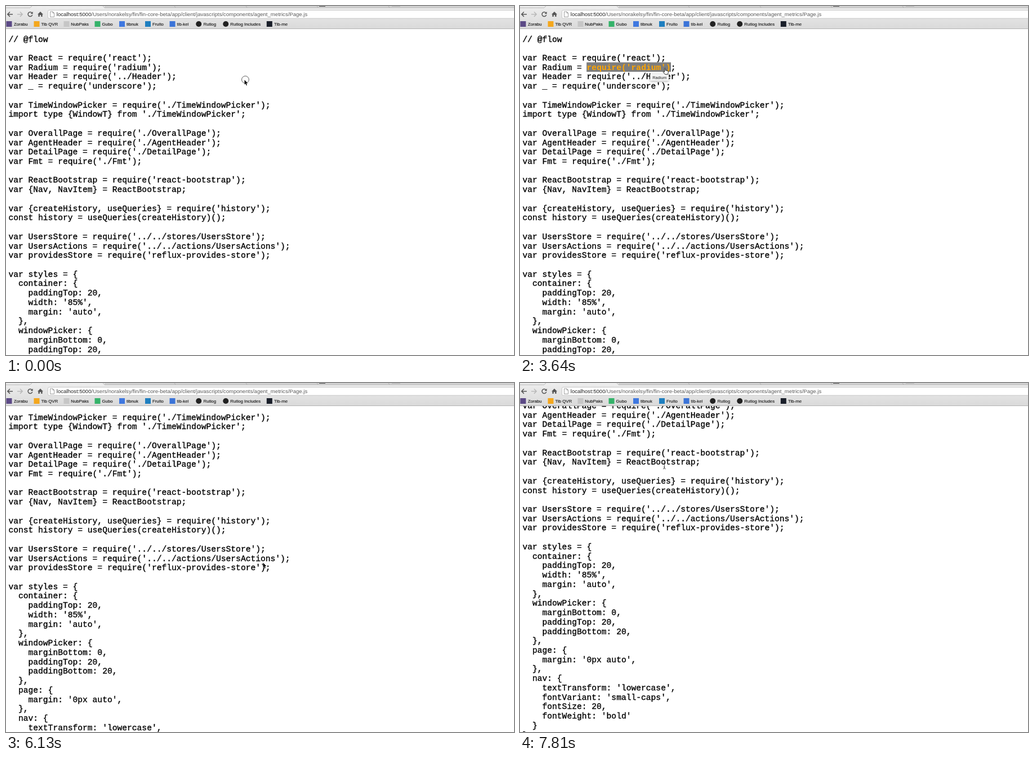
Animation of 902x621 px, one loop 7990 ms. Source, as an HTML page:

```html
<!DOCTYPE html>
<html lang="en">
<head>
<meta charset="utf-8">
<title>Source view</title>
<style>
  html, body { margin: 0; width: 100%; height: 100%; overflow: hidden; background: #fff; }
  svg { display: block; width: 100vw; height: 100vh; }
  text { white-space: pre; }
  .code { font: 14.64px "Liberation Mono", "Courier New", monospace; }
  #code { stroke: #000; stroke-width: .35; }
  .bold { font-weight: bold; fill: #ffa500; }
  .ui { font-family: "Liberation Sans", Arial, sans-serif; }
  .label { font-size: 7.8px; fill: #1a1a1a; stroke: #1a1a1a; stroke-width: .15; }
  #tip rect { filter: drop-shadow(0 1.5px 2px rgba(0, 0, 0, .35)); }
</style>
</head>
<body>
<svg viewBox="0 0 902 621" xmlns="http://www.w3.org/2000/svg">
  <defs>
    <linearGradient id="bar" x2="0" y2="1">
      <stop offset="0" stop-color="#eeeeee"/>
      <stop offset="1" stop-color="#d9d9d9"/>
    </linearGradient>
  </defs>

  <g id="code" class="code"></g>

  <g id="mark" class="code">
    <rect x="118.2" y="100.3" width="149.8" height="16.8" fill="#7d7d7d"/>
    <text class="bold" x="118.6" y="113.7">require('radium')</text>
  </g>

  <g id="chrome" class="ui">
    <rect width="902" height="41" fill="url(#bar)"/>
    <rect x="175" width="727" height="3" fill="#d2d2d2"/>
    <path d="M0 3.2H43L46 0M172 0L175 3.2H902M299 0l2 3M426 0l2 3M552 0l2 3M679 0l2 3" fill="none" stroke="#aaa" stroke-width=".8"/>
    <path d="M556 0h11v1h-11z" fill="#444"/>
    <path d="M685 0h15v.8h-15z" fill="#aaa"/>
    <rect x="74.5" y="7.5" width="840" height="14.5" rx="2" fill="#fff" stroke="#bdbdbd" stroke-width=".8"/>
    <rect y="40" width="902" height="1" fill="#b3b3b3"/>
    <g fill="none" stroke="#555" stroke-width="1.5">
      <path d="M12 14.7H3M7 10.5L2.8 14.7L7 18.9"/>
      <path d="M20 14.7H29M25 10.5L29.2 14.7L25 18.9" stroke="#b9b9b9"/>
      <path d="M46 12.2A3.9 3.9 0 1 0 46.8 15.6"/>
    </g>
    <path d="M47.6 10V14H43.6Z" fill="#555"/>
    <path d="M56 15L61 10L66 15H64.6V19H62.2V16H59.8V19H57.4V15Z" fill="#555"/>
    <path d="M78.5 10H83L85.5 12.5V19.5H78.5ZM83 10V12.5H85.5" fill="#fff" stroke="#888" stroke-width=".8"/>
    <text x="89.8" y="18" font-size="9.57" fill="#5c5c5c"><tspan fill="#222">localhost:5000</tspan>/Users/norakelsy/fin/fin-core-beta/app/client/javascripts/components/agent_metrics/Page.js</text>
  </g>

  <g id="tip" class="ui">
    <rect x="231" y="121" width="33" height="12" fill="#f3f3f3"/>
    <text x="235.2" y="129.7" font-size="7.3" fill="#222">Radium</text>
  </g>

  <circle id="ring" cx="424.9" cy="131" r="6.4" fill="none" stroke="#333" stroke-width=".8"/>

  <path id="arrow" d="M.5 .4V8.8L2.3 7.1L3.7 10.4L5 9.8L3.6 6.6H6.3Z" fill="#000" stroke="#fff" stroke-width=".9" paint-order="stroke"/>
  <path id="hand" d="M3 7V1.3Q3 .5 3.8 .5T4.6 1.3V4.4L8.4 5.1Q9.6 5.4 9.5 6.7V8.6L8.6 11.5H4L1 8.2Q.2 7.2 1 6.7Q1.8 6.4 3 7.6" fill="#fff" stroke="#111" stroke-width=".9" stroke-linejoin="round"/>
  <path id="beam" d="M-2.3 -5Q0 -5 0 -3.6V3.6Q0 5 -2.3 5M2.3 -5Q0 -5 0 -3.6M0 3.6Q0 5 2.3 5M-1.2 2H1.2" fill="none" stroke="#222" stroke-width=".8"/>
</svg>

<script>
const LOOP = 7990;
const $ = id => document.getElementById(id);

const source = `// @flow

var React = require('react');
var Radium = require('radium');
var Header = require('../Header');
var _ = require('underscore');

var TimeWindowPicker = require('./TimeWindowPicker');
import type {WindowT} from './TimeWindowPicker';

var OverallPage = require('./OverallPage');
var AgentHeader = require('./AgentHeader');
var DetailPage = require('./DetailPage');
var Fmt = require('./Fmt');

var ReactBootstrap = require('react-bootstrap');
var {Nav, NavItem} = ReactBootstrap;

var {createHistory, useQueries} = require('history');
const history = useQueries(createHistory)();

var UsersStore = require('../../stores/UsersStore');
var UsersActions = require('../../actions/UsersActions');
var providesStore = require('reflux-provides-store');

var styles = {
  container: {
    paddingTop: 20,
    width: '85%',
    margin: 'auto',
  },
  windowPicker: {
    marginBottom: 0,
    paddingTop: 20,
    paddingBottom: 20,
  },
  page: {
    margin: '0px auto',
  },
  nav: {
    textTransform: 'lowercase',
    fontVariant: 'small-caps',
    fontSize: 20,
    fontWeight: 'bold'
  }
};`;

// Bookmarks: label, label x, icon x, icon colour, round icon
const bookmarks = [
  ['Zorabu', 14, 0.5, '#5c4a86'],
  ['Tib QVR', 62.5, 49.5, '#f4a71d'],
  ['NubPaks', 115.3, 102.5, '#c6c6c6'],
  ['Gubo', 170.5, 157.5, '#35b36a'],
  ['tibnuk', 214, 201, '#3f78e0'],
  ['Frulto', 260, 247, '#1f7fc0'],
  ['tib-kel', 303.5, 290.5, '#3b74d8'],
  ['Rutlog', 350.5, 337.2, '#222', true],
  ['Rutlog Includes', 398.3, 385.2, '#222', true],
  ['Tib-me', 476, 462.8, '#1a1f2a'],
];

function add(parent, tag, attrs, text = '') {
  const el = document.createElementNS('http://www.w3.org/2000/svg', tag);
  for (const key in attrs) el.setAttribute(key, attrs[key]);
  el.textContent = text;
  parent.append(el);
}

source.split('\n').forEach((line, i) => {
  if (line) add($('code'), 'text', { x: 4.4, y: 63.5 + i * 16.73 }, line);
});

for (const [label, x, iconX, fill, round] of bookmarks) {
  add($('chrome'), 'rect', { x: iconX, y: 27, width: 10, height: 10, rx: round ? 5 : 0, fill });
  add($('chrome'), 'text', { x, y: 34.9, class: 'label' }, label);
}

// Every change is a hard step: [start, ...values]
const pointer = [
  [0, 'arrow', 423, 131],
  [600, 'arrow', 412.4, 127.2],
  [740, 'arrow', 295.4, 109.2],
  [1040, 'arrow', 288.6, 109.2],
  [1190, 'arrow', 229.4, 109.2],
  [1340, 'hand', 227.5, 108.8],
  [3640, 'hand', 253.7, 110.2],
  [3810, 'arrow', 447.5, 176],
  [3960, 'arrow', 453.6, 258.5],
  [4110, 'arrow', 430.6, 279.5],
  [4260, 'arrow', 430.4, 285.4],
  [4400, 'arrow', 432.6, 289.4],
  [4550, 'arrow', 432.8, 287.4],
  [4700, 'arrow', 432.8, 281.4],
  [4880, 'arrow', 456, 319.3],
  [7170, 'arrow', 380.4, 248],
  [7370, 'beam', 284, 177],
  [7520, 'beam', 280.4, 170.2],
  [7810, 'beam', 256.3, 147.8],
];
const scroll = [[0, 0], [5950, 16.7], [6130, 115], [6690, 173.2], [6960, 185.8]];
const tipAlpha = [[0, 0], [2740, 1], [4110, .8], [4260, .5], [4400, .2], [4550, 0]];

const at = (steps, t) => steps.filter(s => s[0] <= t).pop().slice(1);
const show = (id, on) => $(id).setAttribute('visibility', on ? 'visible' : 'hidden');
const move = (id, x, y) => $(id).setAttribute('transform', `translate(${x} ${y})`);

function draw(t) {
  const [kind, x, y] = at(pointer, t);
  for (const id of ['arrow', 'hand', 'beam']) show(id, id === kind);
  move(kind, x, y);
  move('code', 0, -at(scroll, t)[0]);
  $('tip').setAttribute('opacity', at(tipAlpha, t)[0]);
  show('mark', t >= 1340 && t < 3810);
  show('ring', t < 150);
}

const start = performance.now();
function tick() {
  draw((performance.now() - start) % LOOP);
  requestAnimationFrame(tick);
}
tick();
</script>
</body>
</html>
```
